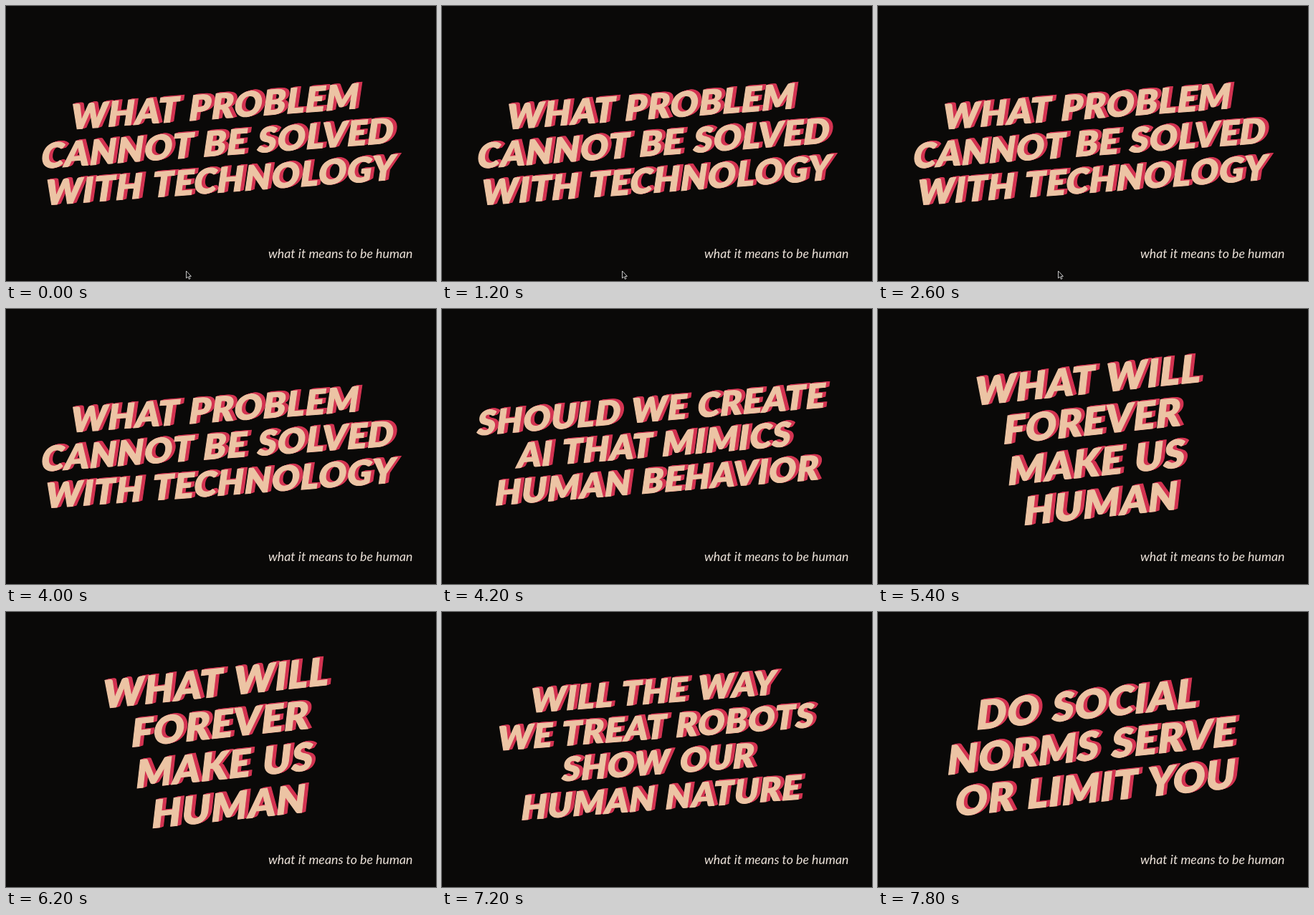
These frames come from a looping animation (600 px wide and 384 px high, 8 s). An HTML page:

```html
<!DOCTYPE html>
<html lang="en">
<head>
<meta charset="utf-8">
<title>what it means to be human</title>
<style>
  html, body { margin: 0; height: 100%; overflow: hidden; background: #0a0908; }
  svg { display: block; width: 600px; height: 384px; }
  text { font-family: Lato, sans-serif; }
  .line { font-weight: 900; text-anchor: middle; letter-spacing: .025em; word-spacing: .05em;
          fill: #ecc4a4; stroke: #ecc4a4; stroke-width: 1.2; }
  .shade { fill: #d33452; stroke: #d33452; }
  .tag { font-style: italic; font-size: 17.8px; fill: #ece2d9; }
</style>
</head>
<body>
<svg viewBox="0 0 600 384">
  <g id="stage"></g>
  <text class="tag" x="366" y="351.5">what it means to be human</text>
  <path id="cursor" d="M251.5 370v10l2.3-2 1.6 3.4 1.6-.8-1.6-3.2h3z" fill="#000" stroke="#ddd" stroke-width=".9"/>
</svg>
<script>
const LOOP = 8000, CURSOR_OFF = 3000, DEPTH = 5;

// start time, block centre, angle, type size, line height, lines
const slides = [
  { at: 0, x: 293.5, y: 209, angle: -4.2, size: 47.7, lead: 51.5,
    lines: ['WHAT PROBLEM', 'CANNOT BE SOLVED', 'WITH TECHNOLOGY'] },
  { at: 4200, x: 294.5, y: 206.5, angle: -4.6, size: 46.5, lead: 49.8,
    lines: ['SHOULD WE CREATE', 'AI THAT MIMICS', 'HUMAN BEHAVIOR'] },
  { at: 5400, x: 300.5, y: 204.5, angle: -6, size: 53, lead: 57.8,
    lines: ['WHAT WILL', 'FOREVER', 'MAKE US', 'HUMAN'] },
  { at: 6600, x: 298.5, y: 201.8, angle: -4.3, size: 45.8, lead: 49.5,
    lines: ['WILL THE WAY', 'WE TREAT ROBOTS', 'SHOW OUR', 'HUMAN NATURE'] },
  { at: 7800, x: 296, y: 207, angle: -5.8, size: 55, lead: 58.6,
    lines: ['DO SOCIAL', 'NORMS SERVE', 'OR LIMIT YOU'] }
];

function add(parent, tag, attrs, text = '') {
  const el = document.createElementNS('http://www.w3.org/2000/svg', tag);
  for (const key in attrs) el.setAttribute(key, attrs[key]);
  el.textContent = text;
  return parent.appendChild(el);
}

const stage = document.getElementById('stage');
const cursor = document.getElementById('cursor');

for (const s of slides) {
  s.group = add(stage, 'g', { transform: `translate(${s.x} ${s.y}) rotate(${s.angle})`, 'font-size': s.size });
  s.lines.forEach((line, i) => {
    const dy = (i - (s.lines.length - 1) / 2) * s.lead;
    const row = add(s.group, 'g', { transform: `translate(0 ${dy}) skewX(-12.5)` });
    for (let k = DEPTH; k >= 0; k--) {
      const attrs = { class: k ? 'line shade' : 'line', x: k, y: -k / 4 };
      if (k) attrs['aria-hidden'] = true;
      add(row, 'text', attrs, line);
    }
  });
}

function draw(now) {
  const t = now % LOOP;
  const current = slides.filter(s => s.at <= t).pop();
  for (const s of slides) s.group.style.display = s === current ? '' : 'none';
  cursor.style.display = t < CURSOR_OFF ? '' : 'none';
}

const start = performance.now();
function tick() {
  draw(performance.now() - start);
  requestAnimationFrame(tick);
}
tick();
</script>
</body>
</html>
```
